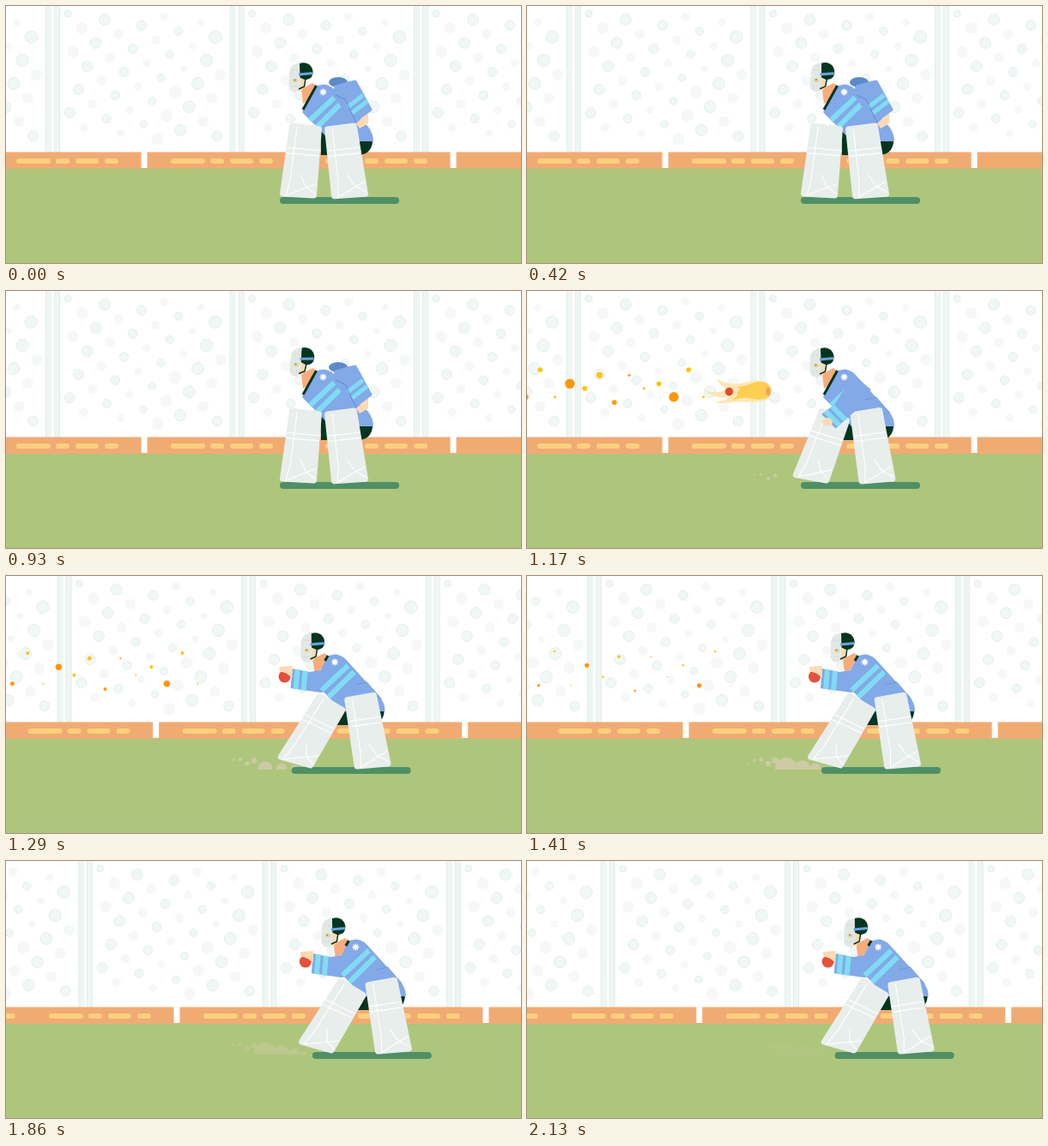
Recreate the animation shown at these times as an HTML page with a canvas. Size 600 by 300 pixels, loop 2160 ms.

```html
<!DOCTYPE html>
<html lang="en">
<head>
<meta charset="utf-8">
<title>Goalkeeper catch</title>
<style>
html, body { margin: 0; width: 600px; height: 300px; overflow: hidden; background: #fff; }
canvas { display: block; }
</style>
</head>
<body>
<canvas id="stage" width="600" height="300"></canvas>
<script>
const ctx = document.getElementById('stage').getContext('2d');
const LOOP = 2160, STEP = 30, CATCH = 1190;
const BLUE = '#82a9e8', CYAN = '#80dcf2', DARK = '#04351f', SKIN = '#fcdab4', PAD = '#e8eeec';

const clamp = v => Math.max(0, Math.min(1, v));
const smooth = v => (v = clamp(v)) * v * (3 - 2 * v);
const mix = (a, b, k) => a + (b - a) * k;
const mixAll = (a, b, k) => a.map((v, i) => mix(v, b[i], k));

function rect(x, y, w, h, color, r = 0) {
  ctx.fillStyle = color;
  ctx.beginPath();
  ctx.roundRect(x, y, w, h, r);
  ctx.fill();
}
function oval(x, y, rx, color, ry = rx) {
  ctx.fillStyle = color;
  ctx.beginPath();
  ctx.ellipse(x, y, rx, ry, 0, 0, 7);
  ctx.fill();
}
function trace(p) {
  ctx.beginPath();
  for (let i = 0; i < p.length; i += 2) ctx.lineTo(p[i], p[i + 1]);
}
function poly(p, color, round = 0) {
  trace(p);
  ctx.closePath();
  ctx.fillStyle = ctx.strokeStyle = color;
  ctx.fill();
  if (round) {
    ctx.lineWidth = round;
    ctx.stroke();
  }
}
function line(p, color, width) {
  trace(p);
  ctx.strokeStyle = color;
  ctx.lineWidth = width;
  ctx.stroke();
}
function shape(path, color) {
  ctx.fillStyle = color;
  ctx.fill(new Path2D(path));
}

// Crowd: evenly scattered dots, every other one ringed
function crowd(x) {
  for (let i = 0; i < 44; i++) {
    const dx = 72 + 182 * (i * 0.618 % 1), y = 9 + 3.4 * i, r = 4 + 3.4 * (i * 0.37 % 1);
    oval(x + dx, y, r, i % 2 ? '#eef1f180' : '#e9f4f1b0');
    if (i % 2) continue;
    ctx.strokeStyle = '#dfedea';
    ctx.lineWidth = 0.8;
    ctx.stroke();
  }
}

function backdrop(shift) {
  rect(0, 0, 600, 300, '#fff');
  for (let n = -2; n < 3; n++) {
    const x = n * 214.5 + shift;
    crowd(x);
    rect(x + 46, 0, 17, 171, '#e3eeeb');
    rect(x + 47, 0, 6, 171, '#eef6f4');
    rect(x + 53, 0, 3, 171, '#fff');
    rect(x + 57, 0, 5, 171, '#eef6f4');
  }
  rect(0, 190, 600, 110, '#aec67c');
  rect(0, 170.5, 600, 19.5, '#f0ab73');
  const dash = (x, w) => rect(x + shift, 178, w, 6, '#fbd07d', 3);
  dash(-67, 40);
  for (let x = 12; x < 400; x += 180) {
    dash(x, 40);
    dash(x + 46, 16);
    dash(x + 69, 27);
    dash(x + 103, 16);
  }
  for (const x of [157.6, 517.6]) rect(x + shift, 170, 7, 19, '#fff');
}

// Sparks zigzag along the ball's path, then drift and shrink
function sparks(tip, k, shift) {
  for (let i = 0; i < 13; i++) {
    const side = i % 2 ? -1 : 1, phase = i * Math.PI * 0.4;
    const x = 17.3 * i - 2 + 1.4 * (i - 6) * k;
    const y = 111 + side * (10 + 9 * Math.cos(phase - Math.PI * 0.4) + 4 * k);
    const r = (i % 7 === 3 ? 5.7 : 2.5 + 1.2 * Math.cos(phase)) * Math.pow(0.45, k);
    if (x < tip - 20 && r > 0.6) oval(x + shift, y, r, i % 7 % 3 ? '#ffc20e' : '#ff960a');
  }
}

function fireball(tip) {
  ctx.save();
  ctx.translate(tip - 284, 0);
  shape('M285 117C285 130 268 131 250 129C238 128 226 134 219 129C226 129 232 127 236 124' +
    'C226 126 214 123 205 115C216 120 226 119 232 114C226 111 222 106 221 101' +
    'C227 109 244 110 258 106C274 102 285 107 285 117Z', '#fde5b4');
  shape('M284 117C284 127 272 128 259 125C252 124 245 126 238 127C245 123 247 121 244 118' +
    'C248 117 249 114 245 111C254 113 261 107 269 106C278 105 284 109 284 117Z', '#fdcf50');
  oval(281, 117, 2.7, '#f3a35f', 5);
  oval(235.5, 117.5, 4.7, '#df4a2f');
  ctx.restore();
}

function dust(t) {
  if (t < 1100) return;
  const grow = smooth((t - 1170) / 200);
  ctx.save();
  ctx.beginPath();
  ctx.rect(0, 180, 600, 46);
  ctx.clip();
  ctx.globalAlpha = 0.68 * clamp(1 - Math.max(0, t - 1410) / 800);
  ctx.fillStyle = '#dccdb9';
  ctx.beginPath();
  const puff = (x, y, r) => {
    ctx.moveTo(x + r, y);
    ctx.arc(x, y, r, 0, 7);
  };
  for (let i = 0; i < 5; i++) puff(257 + 8 * i, 216 + 3 * Math.cos(2 * i), (1 + 0.7 * i) * mix(0.6, 1, grow));
  for (let i = 0; i < 4; i++) puff(302 + 21 * i - 2 * i * i, 225, (13 - 3.3 * i) * grow);
  ctx.fill();
  ctx.restore();
}

// A leg pad from knee to ankle; the foot tilts half as much as the knee
function pad(kneeX, kneeY, ankleX, ankleY) {
  const tilt = Math.atan2(kneeX - ankleX, ankleY - kneeY);
  const at = (u, v) => {
    const half = mix(15.5, 18, v) * (2 * u - 1), a = tilt * (1 - v / 2);
    return [mix(kneeX, ankleX, v) + half * Math.cos(a), mix(kneeY, ankleY, v) + half * Math.sin(a)];
  };
  const points = uv => uv.flatMap((u, i) => i % 2 ? [] : at(u, uv[i + 1]));
  const seam = (...uv) => line(points(uv), '#fff', 1.1);
  poly(points([0, 0, 1, 0, 1, 1, 0, 1]), PAD, 7);
  seam(-0.08, 0.32, 1.08, 0.32);
  seam(-0.08, 0.4, 1.08, 0.4);
  seam(0.18, 0, 0.18, 0.8, 0.1, 1.03);
  seam(0.12, 1.02, 1.06, 0.82);
  seam(0.5, 0.7, 0.72, 0.88, 1.06, 0.98);
}

function head(t) {
  const tilt = 4.5 * smooth(t / 960) * (1 - smooth((t - 1020) / 120));
  ctx.save();
  ctx.translate(350, 99);
  ctx.rotate(tilt * Math.PI / 180);
  ctx.translate(-350, -99);
  shape('M341 80L349 83L349 93L344 99L339 98Z', SKIN);
  shape('M342 67C351 64 358 70 357.5 78C357 84 353 86 348 86L341 83Z', DARK);
  shape('M342 66.5C334 67 330 72 330 79L329.5 95C331 99.5 336 102 340 100L343 91L342.5 83Z', '#e1e8e5');
  line([341, 80, 357, 78.5], '#6ea2e2', 3);
  line([349, 85, 347.5, 94, 341, 97], DARK, 1.5);
  oval(337, 87, 3.2, '#e6d7a0', 2.5);
  oval(336.5, 86.5, 1, '#8a8862');
  for (let i = 0; i < 4; i++) oval(334 + i % 2 * 4, i < 2 ? 75 : 94, 0.7, '#bfcac5');
  ctx.restore();
}

function restingArm() {
  oval(387, 89, 11, '#5c89c8', 6);
  poly([408,137, 422,124, 422,137, 412,143], SKIN);
  poly([384,94, 398,90, 407,88, 425,121, 406,135, 382,104], BLUE, 3);
  line([398,118, 416,104], CYAN, 5);
  line([403,125, 421,111], CYAN, 5);
  line([384,104, 395,109, 408,136], '#5c86c8', 0.9);
}

function catchingArm(hold, caught) {
  const [sx, sy, hx, hy] = mixAll([390,106, 351,152], [375,119, 319,119], hold);
  const len = Math.hypot(hx - sx, hy - sy);
  ctx.save();
  ctx.translate(hx, hy);
  ctx.rotate(Math.atan2(sy - hy, sx - hx));
  poly([1,-11, 21,-7, 34,-9, len,-12, len,14, 34,17, -1,12], BLUE);
  for (const x of [6, 15]) line([x + 1, x / 5 - 11, x - 1, x / 6 + 12], CYAN, 6);
  ctx.restore();
  if (caught) {
    oval(hx - 8, hy - 1.5, 7, '#e4513c');
    poly([hx - 13,hy - 12, hx,hy - 13, hx,hy - 2, hx - 5,hy - 6, hx - 13,hy - 9], SKIN, 2);
  } else oval(hx - 1, hy + 1, 6, SKIN, 5);
}

function keeper(t) {
  const stance = smooth((t - 1080) / 165), hold = smooth((t - 1170) / 60);
  const waiting = t < 1110, caught = t >= CATCH;
  rect(319, 223, 139, 8, '#4f8f66', 4);
  shape('M366 142L427 154C428 168 420 174 410 174L367 174Z', DARK);
  poly([344,97, 357,90, 363,94, 353,109, 346,114], '#f8ac7c');
  shape('M362 93L370 91.5Q377 92 382 97L421 140Q428 148 428 158L378 158L363 142L345 124Z', BLUE);
  line([361.5, 93, mix(346, 358, hold), mix(121, 99, hold)], DARK, 3);
  if (caught) catchingArm(hold, true);
  line([354,133.5, 385,104.5], CYAN, 6);
  line([362,141.5, 392,112], CYAN, 6);
  for (let i = 0; i < 4; i++) {
    const a = i * Math.PI / 4, x = 4 * Math.cos(a), y = 4 * Math.sin(a);
    line([369.5 - x, 100.5 - y, 369.5 + x, 100.5 + y], '#fff', 1.4);
  }
  oval(369.5, 100.5, 2.4, '#fff');
  if (waiting) restingArm();
  else line([393,127, 407,124, 423,143], '#6c92d4', 0.9);
  head(t);
  pad(...mixAll([349,142, 340.5,220], [365,148.5, 324,216], stance));
  pad(...mixAll([390,142, 400.5,220.5], [399.5,142, 413.5,220.5], stance));
  if (!waiting && !caught) catchingArm(0, false);
}

function draw(now) {
  const t = Math.floor(now % LOOP / STEP) * STEP;
  const shift = t > CATCH ? 40.5 * (1 - Math.exp((CATCH - t) / 245)) : 0;
  const tip = 284 + (t - 1170) * 2.4;
  ctx.lineJoin = 'round';
  backdrop(shift);
  dust(t);
  ctx.save();
  ctx.translate(shift, 0);
  keeper(t);
  ctx.restore();
  if (tip > 0) sparks(tip, (t - 1170) / 240, shift);
  if (tip > 0 && t < CATCH) fireball(tip);
}

const start = performance.now();
function tick() {
  draw(performance.now() - start);
  requestAnimationFrame(tick);
}
tick();
</script>
</body>
</html>
```
